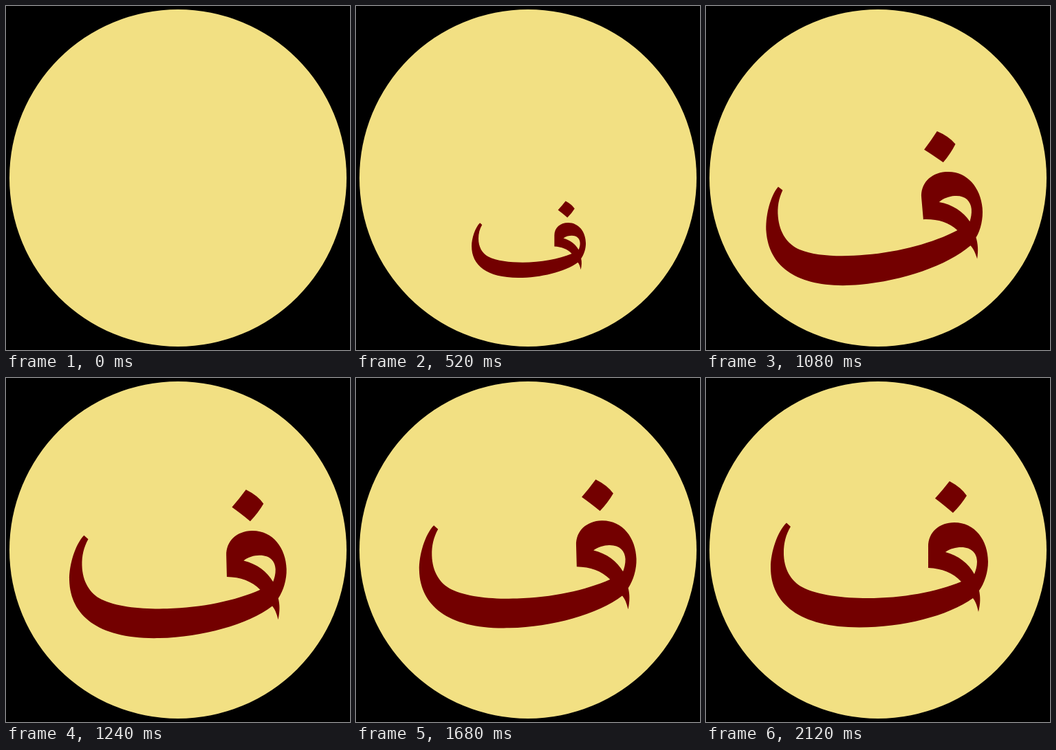
These frames come from a looping animation (500 px wide and 500 px high, 2800 ms). An HTML page:

```html
<!DOCTYPE html>
<html lang="ar">
<head>
<meta charset="utf-8">
<title>Bouncing letter</title>
<style>
  html, body { margin: 0; width: 100%; height: 100%; overflow: hidden; background: #000; }
  svg { display: block; width: 100vw; height: 100vh; }
</style>
</head>
<body>
<svg viewBox="0 0 500 500" role="img" aria-label="ف">
  <circle cx="250" cy="250" r="245" fill="#f2e083"/>
  <g id="letter" fill="#730000" fill-rule="evenodd" visibility="hidden">
    <path d="M117 210.5L123 216C116 228 113 240 113 254C113 277 123 295 140 304
      C163 316 200 320 235 320C285 320 335 311 371 296C359 283 343 277 323 276V245
      C323 224 339 210 361 210C391 210 410 236 410 267C410 282 405 298 397 309
      C399 318 399 328 396 340C394 331 392 325 388 320C352 346 285 362.5 223 362.5
      C136 362.5 94 328 94 275C94 253 104 223 117 210.5Z
      M348 253C355 248 363 246 371 246C386 246 394 255 394 267C394 274 392 280 390 285
      C382 270 367 258 348 253Z"/>
    <path d="M354 150Q371 159 379 171Q371 184 359 196Q345 184 333 175Q344 163 354 150Z"/>
  </g>
</svg>
<script>
  const LOOP = 2800, STEP = 40, REST = 2120;
  const GROWN = 990;                    // full size, tilting begins
  const HOP = 840, HOPS_END = 1700;     // end of the first and of all hops
  const SWING = 282, FADE = 455;        // half period and decay of the tilt

  const letter = document.getElementById('letter');

  // Hops below the resting place, each shorter and shallower than the last
  function drop(t) {
    const fade = Math.max(0, 1 - t / HOPS_END) ** 1.34;
    return 156 * fade * Math.abs(Math.sin(Math.PI * (t / HOP) ** 1.53));
  }

  // Damped swing in degrees
  function tilt(t) {
    const u = t - GROWN;
    return u > 0 ? -7.2 * Math.exp(-u / FADE) * Math.sin(Math.PI * u / SWING) : 0;
  }

  function draw(t) {
    const scale = Math.min(1, t / GROWN);
    letter.setAttribute('visibility', scale > 0 ? 'visible' : 'hidden');
    letter.setAttribute('transform',
      `translate(0 ${drop(t)}) rotate(${tilt(t)} 250 355) ` +
      `translate(250 230) scale(${scale}) translate(-250 -230)`);
  }

  const start = performance.now();
  function tick() {
    const t = (performance.now() - start) % LOOP;
    draw(Math.min(REST, Math.floor(t / STEP) * STEP));
    requestAnimationFrame(tick);
  }
  tick();
</script>
</body>
</html>
```
